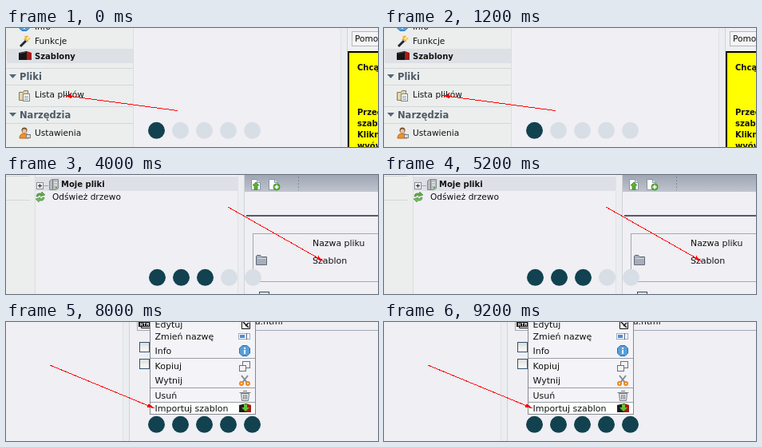
Recreate the animation shown at these times as an HTML page. Size 466x149 px, loop 10000 ms.

```html
<!DOCTYPE html>
<html lang="pl">
<head>
<meta charset="utf-8">
<style>
html, body { margin: 0; width: 100%; height: 100%; overflow: hidden; background: #efeff4; }
svg { display: block; width: 466px; height: 149px; }
text { font-family: Verdana, "DejaVu Sans", sans-serif; fill: #111; white-space: pre; }
rect, .arrow { shape-rendering: crispEdges; }
</style>
</head>
<body>
<svg id="stage" viewBox="0 0 466 149"></svg>
<script>
const rect = (x, y, w, h, fill, stroke) => stroke
  ? `<rect x="${x + .5}" y="${y + .5}" width="${w - 1}" height="${h - 1}" fill="${fill}" stroke="${stroke}"/>`
  : `<rect x="${x}" y="${y}" width="${w}" height="${h}" fill="${fill}"/>`;
const path = (d, fill = 'none', stroke = 'none', width = 1) =>
  `<path d="${d}" fill="${fill}" stroke="${stroke}" stroke-width="${width}"/>`;
const circle = (x, y, r, fill, stroke = 'none') =>
  `<circle cx="${x}" cy="${y}" r="${r}" fill="${fill}" stroke="${stroke}"/>`;
const text = (x, y, s, size = 10.8) => `<text x="${x}" y="${y}" font-size="${size}">${s}</text>`;
const bold = (x, y, s, size = 10, fill = '#111') =>
  `<text x="${x}" y="${y}" font-size="${size}" font-weight="700" style="fill:${fill}">${s}</text>`;

// Icons, each drawn from its top left corner
const shapes = {
  page: path('M.5.5h7l4 4v9h-11z', '#fff', '#8494a4') + path('M7.5.5v4h4', '#dce5ed', '#8494a4'),
  wand: path('M2 14L10 6', 'none', '#252833', 3) + path('M9 7l2-2', 'none', '#eee', 3) +
    path('M11 0l1 3 3 1-3 2 0 3-3-3-3 0 2-3-1-2 3 0z', '#f3b22b') + circle(11, 4, 1.5, '#fff2a0'),
  template: path('M0 3L10 1v11H0z', '#151515') + path('M10 1l6 2v9h-6z', '#a51c18') +
    path('M1 4l8-2', 'none', '#484848'),
  files: path('M.5 3.5h5l1-2h5v12h-11z', '#e8d5a1', '#847b68') +
    rect(5, 5, 9, 10, '#fff', '#75828d') + path('M7 8.5h5M7 10.5h5M7 12.5h5', 'none', '#8b9baa'),
  user: circle(7, 4, 3.5, '#7b5130') + circle(7, 5, 2.5, '#f0c39a') +
    path('M1 14q0-6 6-6t6 6z', '#ef922b', '#b8651c') + rect(9, 9, 6, 5, '#d9dce1', '#76818b'),
  sheet: rect(7, 0, 11, 13, '#fff', '#8296a5') + path('M9 3.5h4M9 5.5h6', 'none', '#9aabb8') +
    path('M8 10l6-7 2 2-6 7-3 1z', '#69b83b', '#397a20', .7) + rect(7, 8, 10, 5, '#3c7d28'),
  list: rect(0, 0, 13, 13, '#fff', '#6d8b45') +
    path('M2 3.5h2M2 6.5h2M2 9.5h2', 'none', '#4b9b24', 2) +
    path('M5 3.5h6M5 6.5h6M5 9.5h6', 'none', '#6c7680'),
  info: path('M4 .5h6l3.5 3.5v6l-3.5 3.5h-6l-3.5-3.5v-6z', '#589fda', '#2470af') +
    rect(6, 3, 2, 2, '#fff') + rect(6, 6, 2, 5, '#fff'),
  server: path('M.5 2.5l3-2h8v11l-3 2h-8z', '#b9bcc0', '#85888d') +
    path('M4.5 1v12', 'none', '#777') + path('M6 4.5h4M6 7.5h4', 'none', '#eee') + rect(8, 10, 2, 2, '#54ad35'),
  refresh: path('M1 6q0-5 6-4l1-2 4 4-6 2 1-2q-3 0-4 2z', '#62a54d', '#3f802b', .5) +
    path('M11 7q0 5-6 4l-1 2-4-4 6-2-1 2q3 0 4-2z', '#70b75a', '#3f802b', .5),
  plus: rect(0, 0, 9, 9, '#fff', '#868b91') + path('M2 4.5h5M4.5 2v5', 'none', '#222'),
  folder: path('M.5 12.5v-11l1-1h4l2 2h6v10z', '#a7adb9', '#626a77') + path('M2 4.5h11', 'none', '#d2d6dd'),
  upload: `<use href="#page"/>` + path('M6 4l4 4H8v5H4V8H2z', '#58b52c', '#337b19', .7),
  add: `<use href="#page"/>` + circle(10, 10, 4, '#67b744', '#438d29') + path('M7.5 10h5M10 7.5v5', 'none', '#fff', 1.5),
  html: path('M3.5.5h9l3 3v11h-12z', '#fff', '#111') + circle(9, 5, 4.2, '#2638b4') +
    rect(0, 7, 17, 6, '#111') +
    path('M2.5 8v4M2.5 10h2M4.5 8v4M6 8.5h3M7.5 8v4M10.5 12V8l1 2 1-2v4M14.5 8v3.5h2', 'none', '#fff', .8),
  box: rect(0, 0, 13, 13, 'url(#shade)', '#315270'),
  edit: path('M2.5.5h7l3 3v8h-10z', '#fff', '#111') + path('M4 3l7 7M7 8l4-4', 'none', '#111', 1.5),
  rename: rect(0, 2, 15, 8, '#fff', '#9aabc0') + rect(2, 4, 6, 4, '#508bd0') + path('M10.5 2v8', 'none', '#536b88'),
  copy: rect(4, 0, 10, 9, '#f4f4f7', '#6b7076') + rect(0, 5, 9, 8, '#f4f4f7', '#6b7076'),
  cut: path('M3 0l7 9M11 0L4 9', 'none', '#858b91', 2) +
    `<g stroke-width="2">${circle(3, 10, 2, 'none', '#ee851e') + circle(11, 10, 2, 'none', '#ee851e')}</g>`,
  trash: path('M2.5 3.5h10l-1 9h-8z', '#e7e9eb', '#747b81') +
    path('M.5 2.5h14M5 .5h5M5.5 5v6M7.5 5v6M9.5 5v6', 'none', '#747b81'),
  load: path('M0 2l9-2v11H0z', '#1e1e1e') + path('M9 0l6 2v9H9z', '#a51c18') +
    path('M6 1h4v4h3l-5 5-5-5h3z', '#60c431')
};
const icon = (name, x, y) => `<use href="#${name}" x="${x}" y="${y}"/>`;

const dots = (count, x = 188.5) => [0, 1, 2, 3, 4].map(i =>
  circle(x + i * 30, 128.3, 10.5, i < count ? '#12424f' : '#d8dee5')).join('');

function arrow(x1, y1, x2, y2) {
  const angle = Math.atan2(y2 - y1, x2 - x1) * 180 / Math.PI;
  return `<g class="arrow">${path(`M${x1} ${y1}L${x2} ${y2}`, 'none', '#f00')}
    <g transform="translate(${x2} ${y2}) rotate(${angle})">${path('M0 0L-9-2.5V2.5z', '#f00')}</g></g>`;
}

const heading = (x, y, s) => path(`M${x} ${y - 7}h9l-4.5 5z`, '#52677b') +
  bold(x + 13, y, s, 11.5, '#4c5966');
const sidebar = w => rect(0, 0, w, 149, '#eceeed') + rect(w, 0, 1, 149, '#dcdde1');
const divider = x => rect(x, 0, 8, 149, '#ecedf0') + rect(x, 0, 1, 149, '#e0e2e5') + rect(x + 8, 0, 1, 149, '#cfd3d8');
const rule = (y, w = 159) => rect(0, y, w, 1, '#d2d6d9');
const toolbar = (x, h) => rect(x, 0, 466 - x, h, 'url(#bar)') +
  icon('upload', x + 8, h - 16) + icon('add', x + 30, h - 16);
const dashes = (x, h) => `<path d="M${x + .5} 2V${h}" stroke="#818894" stroke-dasharray="2 2"/>`;
const frame = (x, y, h) => rect(x, y, 480 - x, h, 'none', '#a3a9b4');

const scenes = [
  sidebar(159) + rect(1, 26, 158, 18, '#dde1e6') +
  text(36, 2, 'Info', 10.6) + icon('info', 16, -10) +
  icon('wand', 16, 9) + text(36, 20, 'Funkcje', 10.6) +
  icon('template', 16, 28) + bold(36, 39, 'Szablony') +
  rule(50) + heading(4, 65, 'Pliki') + rule(71) +
  icon('files', 16, 77) + text(36, 87, 'Lista plików', 10.6) +
  rule(98) + heading(4, 113, 'Narzędzia') + rule(119) +
  icon('user', 16, 124) + text(36, 135, 'Ustawienia', 10.6) +
  divider(419) + rect(433, 4, 40, 19, '#f5f5f7', '#b5b7bd') + text(437, 17, 'Pomoc', 10.6) +
  rect(428, 29, 50, 130, '#000') + rect(430, 31, 48, 128, '#ff0') +
  bold(440, 53, 'Chcąc') + bold(440, 109, 'Przed') + bold(440, 123, 'szablon') +
  bold(440, 137, 'Kliknij') + bold(440, 151, 'wyów') +
  dots(1) + arrow(215, 103.5, 73, 84.5),

  sidebar(160) + rule(1, 140) + heading(5, 24, 'Web') + rule(30, 160) +
  icon('sheet', 16, 36) + icon('list', 17, 55) + icon('info', 17, 73) +
  icon('wand', 16, 92) + icon('template', 16, 111) +
  ['Strona', 'Lista', 'Info', 'Funkcje', 'Szablony'].map((s, i) => text(37, 47 + i * 18.8, s)).join('') +
  rule(130, 160) + heading(5, 148, 'Pliki') +
  rect(163, 2, 256, 18, '#dde1e7') + icon('plus', 168, 6) + rect(177, 10, 6, 1, '#a5a8ad') +
  icon('server', 184, 3) + bold(199, 14, 'Moje pliki') +
  icon('refresh', 167, 20) + text(188, 30, 'Odśwież drzewo', 10.6) +
  divider(420) + toolbar(429, 20) + rect(431, 49, 35, 2, '#555a65') +
  frame(438, 72, 100) + icon('folder', 442, 99) + icon('box', 447, 146) +
  dots(2, 189.5) + arrow(179, 107, 207.5, 17),

  sidebar(36) + rule(1, 29) + rule(31, 30) + rect(37, 2, 254, 18, '#dde1e7') +
  icon('plus', 38, 9) + rect(47, 13, 6, 1, '#a5a8ad') +
  icon('server', 54, 5) + bold(69, 15, 'Moje pliki') +
  icon('refresh', 37, 21) + text(58, 31, 'Odśwież drzewo', 10.6) +
  divider(290) + toolbar(299, 21) + dashes(366, 19) +
  rect(301, 50, 165, 2, '#555a65') + frame(309, 73, 61) +
  text(384, 89, 'Nazwa pliku', 10.9) + icon('folder', 313, 100) + text(384, 111, 'Szablon', 11) +
  icon('box', 317, 146) + dots(3, 189.5) + arrow(278, 40, 398, 108),

  `<path d="M0 8.5H11" stroke="#999" stroke-dasharray="1 1"/>` + rect(-5, 4, 9, 9, '#fff', '#868b91') +
  icon('server', 12, 1) + text(26, 12, 'Moje pliki') +
  icon('refresh', -7, 18) + text(15, 28, 'Odśwież drzewo', 10.6) +
  divider(247) + toolbar(256, 18) + dashes(323, 17) +
  rect(257, 48, 209, 2, '#555a65') + frame(266, 70, 50) +
  text(331, 87, 'Nazwa pliku') + icon('html', 271, 96) + text(331, 108, 'Strona_glowna.html', 10.9) +
  icon('box', 268, 131) + text(290, 141, 'Pokaż miniatury', 11) +
  dots(4) + arrow(210, 58, 283, 106),

  divider(146) + frame(164, -40, 51) + icon('html', 166, -7) + text(312, 3, 'a.html') +
  icon('box', 167, 25) + icon('box', 167, 46) +
  rect(180, -2, 133, 118, '#f4f4f8', '#85898f') + rect(181, 101, 131, 14, '#fff') +
  [45, 82, 100].map(y => rect(181, y, 131, 1, '#999da4')).join('') +
  [['Edytuj', 7], ['Zmień nazwę', 22], ['Info', 40], ['Kopiuj', 59], ['Wytnij', 77], ['Usuń', 96],
    ['Importuj szablon', 112]].map(([s, y]) => text(186.5, y, s, 11)).join('') +
  icon('edit', 293, -3) + icon('rename', 291, 12) + icon('info', 292, 29) + icon('copy', 292, 49) +
  icon('cut', 292, 67) + icon('trash', 292, 86) + icon('load', 292, 102) +
  dots(5) + arrow(55, 54, 186, 108)
];

const gradient = (id, top, bottom) => `<linearGradient id="${id}" x2="0" y2="1">
  <stop stop-color="${top}"/><stop offset="1" stop-color="${bottom}"/></linearGradient>`;
const defs = Object.entries(shapes).map(([id, body]) => `<g id="${id}">${body}</g>`).join('');
const stage = document.getElementById('stage');
stage.innerHTML = `<defs>${gradient('bar', '#9fa6b3', '#bfc4cd')}${gradient('shade', '#dcdcd8', '#fff')}${defs}</defs>` +
  scenes.map(body => `<g class="scene">${body}</g>`).join('');
const groups = stage.querySelectorAll('.scene');

const start = performance.now();
function draw(now) {
  const current = Math.floor(Math.max(0, now - start) % 10000 / 2000);
  groups.forEach((group, i) => group.setAttribute('display', i === current ? 'inline' : 'none'));
  requestAnimationFrame(draw);
}
draw(start);
</script>
</body>
</html>
```
